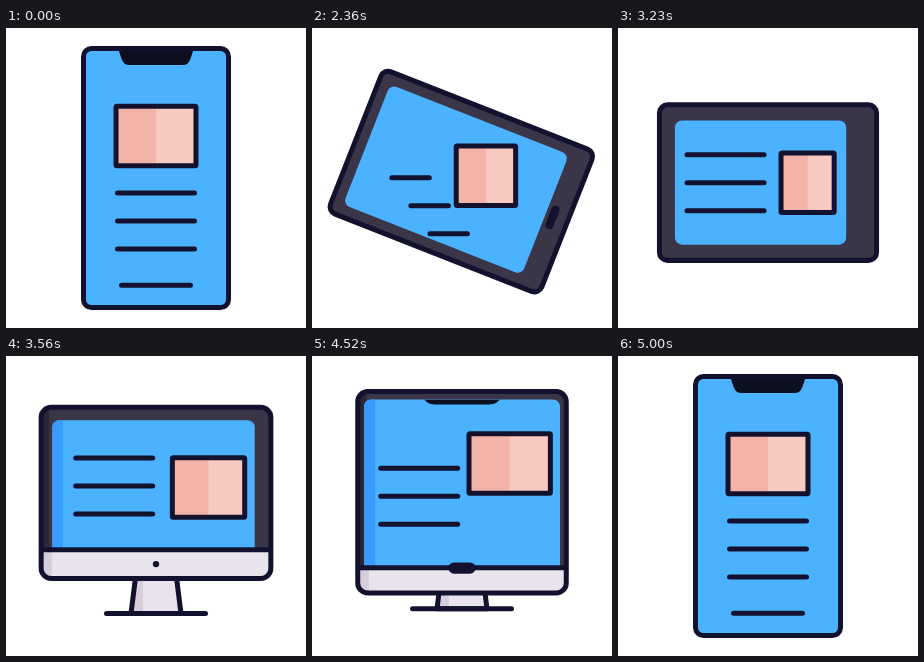
An HTML page with a canvas that plays this animation: 300x300 px, repeating every 5.03 s.

```html
<!DOCTYPE html>
<html lang="en">
<head>
<meta charset="utf-8">
<title>Responsive devices</title>
<style>
  html, body { margin: 0; width: 100%; height: 100%; overflow: hidden; background: #fff; }
  canvas { display: block; }
</style>
</head>
<body>
<canvas id="stage" width="300" height="300"></canvas>
<script>
const ctx = document.getElementById('stage').getContext('2d');
const LOOP = 5030, STEP = 30;
const INK = '#12122f', NOTCH = '#0c101e', BLUE = '#4ab2ff', BLUE_SHADE = '#389cff',
      BEZEL = '#3b3548', BEZEL_SHADE = '#2a2636', METAL = '#e8e3ec', METAL_SHADE = '#d8cdda',
      PINK = '#f4b3a9', PINK_LIGHT = '#f8c9c1';
const LINE_HALF = 38.5, LINE_GAP = 28, PICTURE_HEIGHT = 59.5;

// Screen and button positions are relative to the body centre.
const phone = {
  x: 150, y: 150, w: 145, h: 259, radius: 8, angle: 0,
  screenX: 0, screenY: 0, bezelX: 0, bezelY: 0,
  pictureX: 150, pictureY: 108, pictureW: 80,
  linesX: 150, linesY: 193, lineHalf: LINE_HALF, lineSkew: 0,
  shade: 0, chin: 0, notch: 16.5, base: 243,
  buttonY: 107.3, buttonW: 74, buttonH: 5
};
const tablet = {
  ...phone, y: 154.75, w: 217, h: 155.5,
  screenX: -7.5, bezelX: 46, bezelY: 31.5,
  pictureX: 189.5, pictureY: 155, pictureW: 53,
  linesX: 107.5, linesY: 155,
  notch: 0, base: 225, buttonY: 77.75, buttonW: 5
};
// The tablet as the phone sees it before its quarter turn.
const turned = {
  ...tablet, w: tablet.h, h: tablet.w, angle: -90,
  screenX: 0, screenY: tablet.screenX, bezelX: tablet.bezelY, bezelY: tablet.bezelX,
  notch: -phone.notch, buttonY: 95, buttonW: 9, buttonH: 9
};
const monitor = {
  ...tablet, y: 128, w: 236, h: 179, radius: 11,
  screenX: 0, screenY: -7.5, bezelX: 18, bezelY: 38,
  pictureX: 209, pictureY: 120, pictureW: 82,
  linesX: 108.5, linesY: 117.5,
  shade: 16, chin: 43, base: 257, buttonY: 68, buttonW: 7, buttonH: 7
};

// "swing" is added in the middle of a move and fades out at both ends.
const moves = [
  { start: 2000, end: 2600, from: phone, to: turned, handles: [0.4, 0.45],
    swing: { x: -1, pictureX: -9, pictureY: 6, linesY: 20, lineHalf: -29, lineSkew: 28 } },
  { start: 3200, end: 3800, from: tablet, to: monitor, handles: [0.42, 0.58],
    swing: { base: 13 } },
  { start: 4370, end: 5000, from: monitor, to: phone, handles: [0.2, 0.4],
    swing: { y: 2, h: -2, pictureX: 8, pictureY: -11, linesX: -17, chin: -6, buttonY: -5, buttonH: 6 } }
];

// Cubic Bezier with handles (x1, 0) and (x2, 1).
function ease(t, [x1, x2]) {
  if (t <= 0) return 0;
  if (t >= 1) return 1;
  let lo = 0, hi = 1, s;
  for (let i = 0; i < 24; i++) {
    s = (lo + hi) / 2;
    const x = 3 * (1 - s) ** 2 * s * x1 + 3 * (1 - s) * s * s * x2 + s ** 3;
    if (x < t) lo = s; else hi = s;
  }
  return s * s * (3 - 2 * s);
}

function poseAt(time) {
  const { start, end, from, to, handles, swing } = moves.find(m => time < m.end) ?? moves.at(-1);
  const e = ease((time - start) / (end - start), handles);
  const bump = Math.sin(Math.PI * e);
  const pose = {};
  for (const key in from)
    pose[key] = from[key] + (to[key] - from[key]) * e + (swing[key] ?? 0) * bump;
  return pose;
}

function box(cx, cy, w, h, r) {
  ctx.beginPath();
  ctx.roundRect(cx - w / 2, cy - h / 2, w, h, r);
}

function fill(color) {
  ctx.fillStyle = color;
  ctx.fill();
}

function rect(color, x, y, w, h) {
  ctx.fillStyle = color;
  ctx.fillRect(x, y, w, h);
}

function line(x1, y1, x2, y2) {
  ctx.beginPath();
  ctx.moveTo(x1, y1);
  ctx.lineTo(x2, y2);
  ctx.stroke();
}

function isolated(paint) {
  ctx.save();
  paint();
  ctx.restore();
}

function drawStand(base) {
  const top = base - 40;
  ctx.beginPath();
  ctx.moveTo(130, top);
  ctx.lineTo(125, base);
  ctx.lineTo(175, base);
  ctx.lineTo(170, top);
  ctx.closePath();
  isolated(() => {
    ctx.clip();
    rect(METAL, 120, top, 60, 40);
    rect(METAL_SHADE, 120, top, 17, 40);
  });
  ctx.stroke();
  line(100.5, base, 199.5, base);
}

function drawNotch(top, depth) {
  if (depth <= 0) return;
  const shoulder = top + depth * 0.7, bottom = top + depth;
  ctx.beginPath();
  ctx.moveTo(-38, top);
  ctx.lineTo(-34, shoulder);
  ctx.quadraticCurveTo(-32, bottom, -27, bottom);
  ctx.lineTo(27, bottom);
  ctx.quadraticCurveTo(32, bottom, 34, shoulder);
  ctx.lineTo(38, top);
  fill(NOTCH);
}

function drawScreen(p) {
  const w = p.w - p.bezelX, h = p.h - p.bezelY;
  const left = p.screenX - w / 2, top = p.screenY - h / 2;
  box(0, 0, p.w, p.h, p.radius);
  fill(BEZEL);
  ctx.clip();
  rect(BEZEL_SHADE, -p.w / 2, -p.h / 2, p.shade * 0.75, p.h);
  box(p.screenX, p.screenY, w, h, 7);
  fill(BLUE);
  ctx.clip();
  rect(BLUE_SHADE, left, top, p.shade, h);
  drawNotch(top, p.notch);
}

function drawContent(p) {
  for (let i = -1; i <= 1; i++) {
    const x = p.linesX + p.lineSkew * i, y = p.linesY + LINE_GAP * i;
    line(x - p.lineHalf, y, x + p.lineHalf, y);
  }
  const w = p.pictureW, h = PICTURE_HEIGHT, top = p.pictureY - h / 2;
  rect(PINK_LIGHT, p.pictureX - w / 2, top, w, h);
  rect(PINK, p.pictureX - w / 2, top, w / 2, h);
  box(p.pictureX, p.pictureY, w, h, 1);
  ctx.stroke();
}

function drawChin({ w, h, radius, chin, shade }) {
  if (chin <= 0) return;
  const left = -w / 2, top = h / 2 - chin;
  box(0, 0, w, h, radius);
  ctx.clip();
  rect(METAL, left, top, w, chin);
  rect(METAL_SHADE, left, top, shade, chin);
  line(left, top, -left, top);
}

function draw(p) {
  const onBody = paint => isolated(() => {
    ctx.translate(p.x, p.y);
    ctx.rotate(p.angle * Math.PI / 180);
    paint();
  });

  ctx.clearRect(0, 0, 300, 300);
  ctx.strokeStyle = INK;
  ctx.lineWidth = 5;
  ctx.lineCap = ctx.lineJoin = 'round';
  if (!p.angle) drawStand(p.base);
  onBody(() => drawScreen(p));
  drawContent(p);
  onBody(() => drawChin(p));
  onBody(() => {
    box(0, p.buttonY, p.buttonW, p.buttonH, Math.min(p.buttonW, p.buttonH) / 2);
    fill(INK);
    box(0, 0, p.w, p.h, p.radius);
    ctx.stroke();
  });
}

const origin = performance.now();
function tick() {
  const time = (performance.now() - origin) % LOOP;
  draw(poseAt(Math.floor((time - 20) / STEP) * STEP + 20));
  requestAnimationFrame(tick);
}
tick();
</script>
</body>
</html>
```
